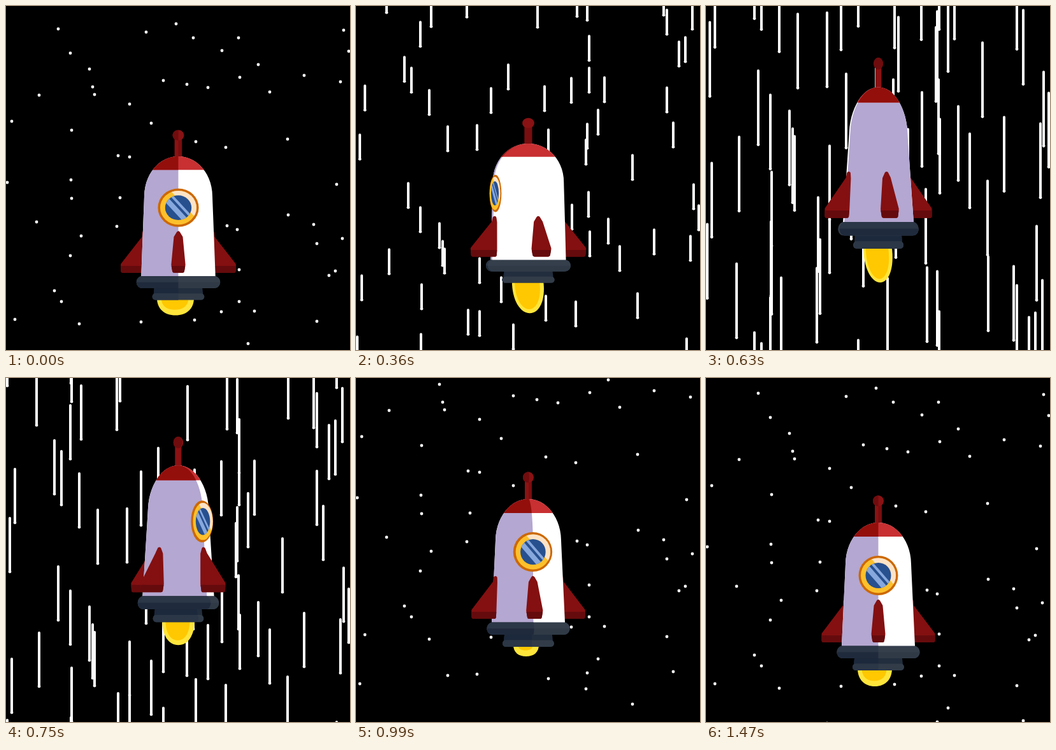
An HTML page with a canvas that plays this animation: 540x540 px, repeating every 1.53 s.

```html
<!DOCTYPE html>
<html lang="en">
<head>
<meta charset="utf-8">
<title>Rocket</title>
<style>
html, body { margin: 0; width: 100%; height: 100%; overflow: hidden; background: #000; }
canvas { display: block; width: 540px; height: 540px; }
</style>
</head>
<body>
<canvas id="stage" width="540" height="540"></canvas>
<script>
const ctx = document.getElementById('stage').getContext('2d');
const LOOP = 1530, STEP = 30, LAST = 49, CX = 270.5, TILE = 609;
const { PI, sin, cos, sqrt, min, max, abs, sign } = Math;

// x, y pairs; the field repeats every TILE pixels downwards
const stars = [
  82,36, 220,41, 267,28, 294,50, 365,50, 530,38, 538,71, 101,74, 339,70, 131,99,
  396,92, 247,117, 367,112, 468,109, 284,123, 317,128, 136,127, 139,139, 525,119, 414,135,
  52,140, 194,154, 9,181, 228,184, 103,195, 298,213, 345,222, 442,209, 176,235, 194,237,
  2,277, 102,273, 103,302, 179,301, 519,280, 443,328, 48,339, 118,361, 174,346, 347,345,
  363,351, 483,343, 488,373, 528,365, 101,392, 366,414, 507,423, 517,416, 76,447, 87,464,
  366,464, 338,480, 390,479, 488,495, 14,492, 115,499, 212,496, 296,493, 380,530, 6,569,
  144,556, 190,554, 302,561, 363,552, 361,577, 498,550, 434,601, 239,459, 247,258, 285,362
];

// Hermite curve through [frame, value, slope]; a missing slope follows the neighbours
function track(...keys) {
  const slope = i => {
    if (keys[i].length > 2) return keys[i][2];
    const a = keys[max(i - 1, 0)], b = keys[min(i + 1, keys.length - 1)];
    return (b[1] - a[1]) / (b[0] - a[0]);
  };
  return f => {
    if (f <= keys[0][0]) return keys[0][1];
    const i = keys.findIndex(k => k[0] >= f);
    if (i < 0) return keys[keys.length - 1][1];
    const [f0, a] = keys[i - 1], [f1, b] = keys[i];
    const d = f1 - f0, t = (f - f0) / d, r = 1 - t;
    return r * r * (1 + 2 * t) * a + t * t * (3 - 2 * t) * b
      + t * r * d * (r * slope(i - 1) - t * slope(i));
  };
}

const travel = track([0, 0, 11], [6, 69, 14], [17, 570, 61], [25, 953, 32], [33, 1129, 11.5], [41, 1187, 4], [49, 1206, 2]);
const trail = track([8, 0, 0], [17, 110, 6], [25, 86, -14], [31, 0, 0]);
const baseY = track([0, 443, 2.5], [6, 454, 0], [17, 375.5, -5], [25, 363, 4], [33, 403, 4.5], [41, 430, 2], [49, 440, 0.8]);
const stretch = track([0, 0.972, -0.036], [6, 0.79, -0.01], [17, 1.095, 0.005], [25, 1.06, -0.01], [33, 1, 0], [49, 1, 0]);
const turn = track([6, 360, 0], [17, 178, -20], [25, 53, -10], [33, 8, -2.3], [41, 0, 0]);
const flameLength = track([0, 24], [6, 19], [17, 64, 0], [25, 36], [33, 15, 0], [41, 16], [49, 25]);
const flameWidth = track([0, 29], [6, 32, 0], [17, 19, 0], [25, 25.5, 0], [33, 20, 0], [41, 22.5], [49, 27]);
const flameShift = track([0, -4.5], [6, 0.5], [17, -2.5], [25, 0], [33, -3.5], [41, -5], [49, -5.5]);
const flameLean = track([8, 0, 0], [17, 8, 0], [25, 0, 0]);

let base, tall, wide, angle;

// Rocket space: x from the axis, h above the collar's lower edge
const widen = h => 1 + wide * (0.18 + 0.82 * min(max(h, 0) / 190, 1));
const px = (x, h) => CX + x * widen(h);
const py = h => base - h * tall;

const bulge = (mid, half, flat, r) => h => flat + r * sqrt(max(0, 1 - ((h - mid) / half) ** 2));
const hull = h => h < 147 ? 57.5 - (h - 19.5) * 0.047 : 51.5 * sqrt(max(0, 1 - ((h - 147) / 66) ** 2));

function band(h0, h1, width, u0, u1, color) {
  const n = 28;
  ctx.beginPath();
  for (let i = 0; i <= 2 * n + 1; i++) {
    const up = i <= n, k = (up ? i : 2 * n + 1 - i) / n;
    const h = h0 + (h1 - h0) * sin(k * PI / 2);
    ctx.lineTo(px(width(h) * (up ? u0 : u1), h), py(h));
  }
  ctx.fillStyle = color;
  ctx.fill();
}

// A solid of revolution with one dark and one light half
function lathe(h0, h1, width, dark, light) {
  const s = sin(angle);
  band(h0, h1, width, -1, 1, light);
  if (cos(angle) > 0) band(h0, h1, width, -1, s, dark);
  else band(h0, h1, width, -s, 1, dark);
}

function drawStars(f) {
  const shift = travel(f), length = trail(f);
  ctx.fillStyle = ctx.strokeStyle = '#fff';
  ctx.lineWidth = 4;
  ctx.lineCap = 'round';
  for (let i = 0; i < stars.length; i += 2) {
    const x = stars[i], top = (stars[i + 1] + shift) % TILE;
    for (const y of [top, top + TILE]) {
      if (y - length > 545) continue;
      if (length > 1) {
        ctx.beginPath();
        ctx.moveTo(x, y - length + 2);
        ctx.lineTo(x, y);
        ctx.stroke();
      }
      ctx.beginPath();
      ctx.arc(x, y, 2.4, 0, 2 * PI);
      ctx.fill();
    }
  }
}

function flameShape(x, y, w, length, lean, color) {
  if (w <= 0 || length <= 0) return;
  const tip = x + lean, low = y + length, mid = y + length * 0.58;
  ctx.beginPath();
  ctx.moveTo(x - w, y - 3);
  ctx.bezierCurveTo(x - w, mid, tip - w * 0.6, low, tip, low);
  ctx.bezierCurveTo(tip + w * 0.6, low, x + w + lean * 1.2, mid, x + w, y - 3);
  ctx.fillStyle = color;
  ctx.fill();
}

function drawFlame(f) {
  const length = flameLength(f), w = flameWidth(f), inset = 10 - length * 0.1;
  const x = CX + flameShift(f), y = py(-19), lean = flameLean(f);
  flameShape(x, y, w, length, lean, '#ffe53b');
  flameShape(x - 1, y, w - inset, length - inset - 1, lean, '#ffc800');
}

function drawFin(a) {
  const s = sin(a), d = sign(s) || 1, t = 8 * abs(cos(a));
  const inner = h => (hull(h) - 2) * s, tip = 86 * s;
  const outline = [
    [inner(28) - d * t * 0.8, 28], [inner(36) - d * t, 38], [inner(80) - d * t * 0.5, 82],
    [inner(88), 89], [inner(80) + d * t * 0.5, 82],
    [tip + d * t, 38], [tip + d * t * 0.8, 28]
  ];
  ctx.beginPath();
  for (const [x, h] of outline) ctx.lineTo(px(x, h), py(h));
  ctx.closePath();
  ctx.lineJoin = 'round';
  ctx.lineWidth = 6;
  const paint = color => {
    ctx.fillStyle = ctx.strokeStyle = color;
    ctx.fill();
    ctx.stroke();
  };
  const path = new Path2D();
  path.rect(0, py(36), 540, 60);
  paint('#841011');
  ctx.save();
  ctx.clip(path);
  paint('#650b0d');
  ctx.restore();
}

function drawWindow() {
  const c = cos(angle), s = sin(angle), h = 130;
  if (c < 0.03) return;
  const disc = (r, color) => {
    ctx.beginPath();
    ctx.arc(0, 0, r, 0, 2 * PI);
    ctx.fillStyle = color;
    ctx.fill();
  };
  const stripes = (r, color, ...spans) => {
    ctx.save();
    ctx.beginPath();
    ctx.arc(0, 0, r, 0, 2 * PI);
    ctx.clip();
    ctx.rotate(49 * PI / 180);
    ctx.fillStyle = color;
    for (const [from, to] of spans) ctx.fillRect(-40, -to, 80, to - from);
    ctx.restore();
  };
  ctx.save();
  ctx.translate(px(50 * s, h), py(h));
  ctx.scale(widen(h) * c, tall);
  disc(31, '#cc6804');
  ctx.translate(3 * s, 0);
  disc(27.5, '#fdc02c');
  stripes(27.5, '#fde3c6', [9, 40]);
  disc(20, '#27508f');
  stripes(20, '#87a8dd', [-9, -1], [3, 7]);
  ctx.restore();
}

// Streaks circling the hull: height, radius, depth, tilt, start and end in degrees
const rings = [
  [151, 77, 24, 9, -84, -48],
  [132, 75, 20, 7, -58, 0],
  [157, 55, -30, 0, 95, 130],
  [29, 90, 13, 0, -90, -47]
];

function drawSwirls(f, front) {
  if (f < 14 || f > 20) return;
  ctx.strokeStyle = '#19c5bd';
  ctx.lineWidth = 4.5;
  ctx.lineCap = 'round';
  for (const [h, r, depth, tilt, from, to] of rings) {
    const n = 16;
    ctx.beginPath();
    let drawing = false;
    for (let i = 0; i <= n; i++) {
      const a = (from + (to - from) * i / n - (f - 17) * 22) * PI / 180;
      if (cos(a) >= 0 !== front) { drawing = false; continue; }
      const x = CX + r * sin(a), y = base - h + depth * cos(a) + tilt * sin(a);
      drawing ? ctx.lineTo(x, y) : ctx.moveTo(x, y);
      drawing = true;
    }
    ctx.stroke();
  }
}

function drawRocket(f) {
  base = baseY(f);
  tall = stretch(f);
  wide = tall ** -1.65 - 1;
  angle = turn(f) * PI / 180;
  const fins = [0, 1, 2, 3].map(i => angle + i * PI / 2);
  const facing = a => cos(a) > 0.1;

  drawSwirls(f, false);
  drawFlame(f);
  fins.filter(a => !facing(a)).forEach(drawFin);

  lathe(210, 242, () => 5.5, '#8b1213', '#780e10');
  lathe(238.5, 255.5, bulge(247, 8.5, 0, 8.5), '#6f0c0e', '#881214');
  lathe(19, 213, hull, '#b4a7d1', '#fff');
  lathe(191, 213, hull, '#930f0c', '#c83032');

  lathe(-11, 1, h => 37.5 - h * 0.1, '#1c283b', '#222d3d');
  lathe(-19, -8.5, bulge(-13.75, 5.25, 35.5, 5), '#2b3646', '#323c49');
  const collar = bulge(9.75, 9.75, 56, 9);
  lathe(0, 19.5, collar, '#2b3646', '#353f4c');
  lathe(0, 9.75, collar, '#1f2a3c', '#303a47');

  fins.filter(facing).forEach(drawFin);
  drawWindow();
  drawSwirls(f, true);
}

const start = performance.now();
function render() {
  const time = (performance.now() - start) % LOOP;
  const f = min(Math.floor(time / STEP), LAST);
  ctx.fillStyle = '#000';
  ctx.fillRect(0, 0, 540, 540);
  drawStars(f);
  drawRocket(f);
  requestAnimationFrame(render);
}
render();
</script>
</body>
</html>
```
